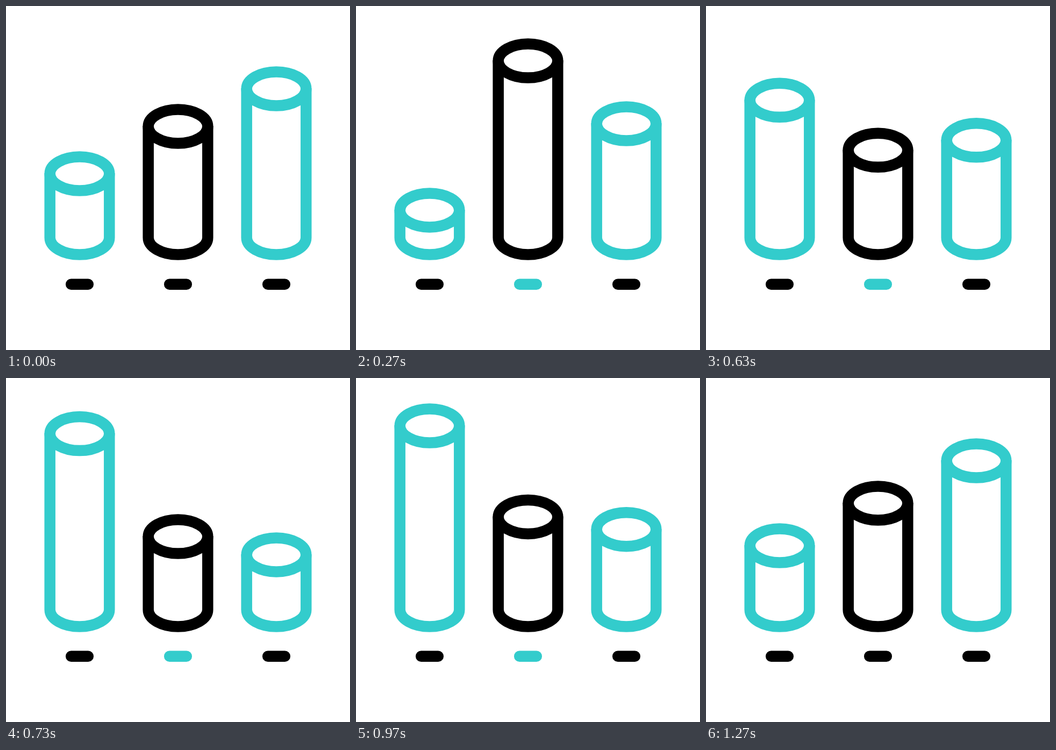
Write an HTML page with a canvas that moves like this. It is 640x640 px and loops after 1.67 s.

```html
<!DOCTYPE html>
<html lang="en">
<head>
<meta charset="utf-8">
<title>Cylinder chart</title>
<style>
  html, body { margin: 0; width: 100%; height: 100%; overflow: hidden; background: #fff; }
  canvas { display: block; width: 100vmin; height: 100vmin; }
</style>
</head>
<body>
<canvas id="stage" width="640" height="640"></canvas>
<script>
const ctx = document.getElementById('stage').getContext('2d');
const TEAL = '#33cccc', BLACK = '#000';
const LOOP = 1670, STEP = 100 / 3, LAST = 38;
const RX = 55.3, RY = 31.5, BASE = 431;
const DASH_Y = 517.7, DASH_HALF = 15.8;

// Symmetric ease with bezier handles (.5, 0) and (.5, 1)
function ease(x) {
  let lo = 0, hi = 1;
  for (let i = 0; i < 24; i++) {
    const u = (lo + hi) / 2;
    if (1.5 * u * (1 - u) + u ** 3 < x) lo = u; else hi = u;
  }
  return lo * lo * (3 - 2 * lo);
}

// Eased progress from 0 to 1 between two steps
function glide(step, from, to) {
  const x = (step - from) / (to - from);
  return x <= 0 ? 0 : x >= 1 ? 1 : ease(x);
}

// Height of each rim: a start level plus successive glides
const rims = [
  s => 312 + 68 * glide(s, 0, 8.3) - 311 * glide(s, 8.3, 26.7) + 243 * glide(s, 26.7, 37),
  s => 224 - 122 * glide(s, 0, 7.9) + 196 * glide(s, 7.9, 23.6) - 65 * glide(s, 24, 33),
  s => 154 + 67 * (glide(s, 0, 7) - glide(s, 7, 14.1))
           + 184 * (glide(s, 14.1, 23.7) - glide(s, 23.7, 37))
];

function drawCylinder(x, y, color) {
  ctx.strokeStyle = color;
  ctx.lineCap = 'butt';
  ctx.beginPath();
  ctx.ellipse(x, y, RX, RY, 0, 0, Math.PI * 2);
  ctx.stroke();
  ctx.beginPath();
  ctx.moveTo(x + RX, y - 1);
  ctx.ellipse(x, BASE, RX, RY, 0, 0, Math.PI);
  ctx.lineTo(x - RX, y - 1);
  ctx.stroke();
}

function drawDash(x, color) {
  ctx.strokeStyle = color;
  ctx.lineCap = 'round';
  ctx.beginPath();
  ctx.moveTo(x - DASH_HALF, DASH_Y);
  ctx.lineTo(x + DASH_HALF, DASH_Y);
  ctx.stroke();
}

function draw(time) {
  const step = Math.min(LAST, Math.floor((time % LOOP + 5) / STEP));
  const moving = step > 0 && step < LAST;
  ctx.fillStyle = '#fff';
  ctx.fillRect(0, 0, 640, 640);
  ctx.lineWidth = 20.5;
  rims.forEach((rim, i) => {
    const x = 137 + 183 * i, middle = i === 1;
    drawCylinder(x, rim(step), middle ? BLACK : TEAL);
    drawDash(x, middle && moving ? TEAL : BLACK);
  });
}

let start;
function tick(now) {
  start ??= now;
  draw(now - start);
  requestAnimationFrame(tick);
}
draw(0);
requestAnimationFrame(tick);
</script>
</body>
</html>
```
